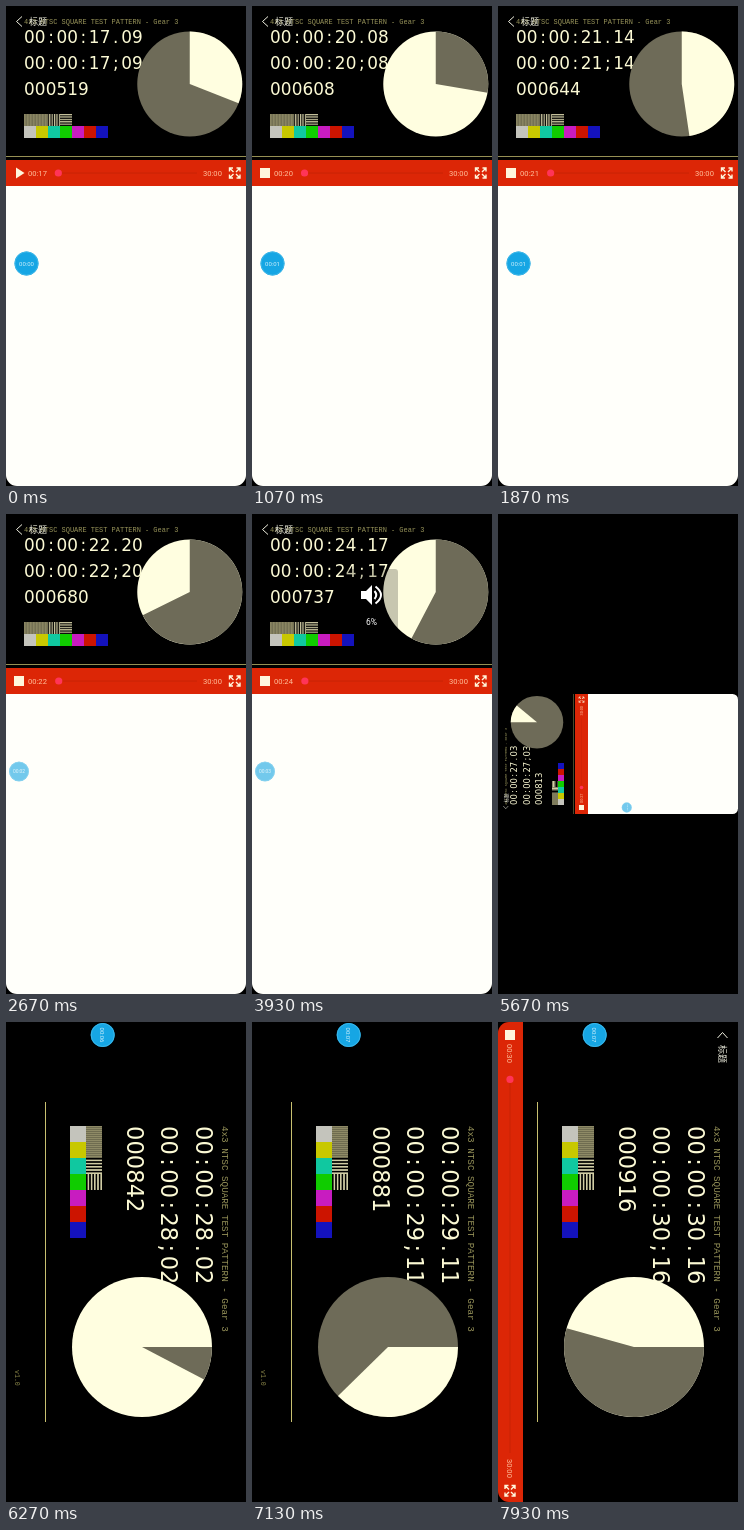
These frames come from a looping animation (240 px wide and 480 px high, 8 s). An HTML page:

```html
<!DOCTYPE html>
<html lang="zh">
<head>
<meta charset="utf-8">
<title>Player</title>
<style>
  html, body { margin: 0; width: 100%; height: 100%; overflow: hidden; background: #000; }
  svg { display: block; width: 100vw; height: 100vh; }
  .mono { font-family: "Liberation Mono", monospace; }
  .digits { font-family: "DejaVu Sans", sans-serif; font-size: 22.5px; text-anchor: middle; fill: #fbf9d4; }
  .ui { font-family: Roboto, sans-serif; }
  .cjk { font-family: "Noto Sans CJK SC", "Noto Sans CJK", sans-serif; }
</style>
</head>
<body>
<svg viewBox="0 0 240 480">
  <defs>
    <clipPath id="corners"><rect id="cornerRect" rx="11"/></clipPath>
    <pattern id="fine" width="2" height="2" patternUnits="userSpaceOnUse">
      <rect width="2" height="2" fill="#6f6c50"/><rect width="1" height="2" fill="#8e8a66"/>
    </pattern>
    <pattern id="cols" width="3.2" height="4" patternUnits="userSpaceOnUse"><rect width="1.6" height="4" fill="#d0cca4"/></pattern>
    <pattern id="rows" width="4" height="3.2" patternUnits="userSpaceOnUse"><rect width="4" height="1.6" fill="#d0cca4"/></pattern>
  </defs>
  <rect width="240" height="480" fill="#000"/>
  <g id="screen">
    <g clip-path="url(#corners)">
      <rect id="page" y="180" width="240" height="300" fill="#fffffa"/>
      <g id="video">
        <text class="mono" x="24" y="24" font-size="9.28" fill="#98945a">4x3 NTSC SQUARE TEST PATTERN - Gear 3</text>
        <text class="digits" id="code1" y="49.6"/>
        <text class="digits" id="code2" y="84.6"/>
        <text class="digits" id="count" y="118.6"/>
        <rect x="24" y="144" width="32" height="16" fill="url(#fine)"/>
        <rect x="56" y="144" width="16" height="16" fill="url(#cols)"/>
        <rect x="72" y="144" width="16" height="16" fill="url(#rows)"/>
        <g id="bars"/>
        <rect y="200" width="320" height="1" fill="#c8c070"/>
        <text class="mono" x="268" y="231" font-size="6.6" fill="#8a8648">v1.0</text>
        <circle id="disc" cx="245" cy="104" r="70"/>
        <path id="wedge"/>
      </g>
      <g id="controls">
        <path d="M16 10.5L10.5 15.5L16 20.5" fill="none" stroke="#f0f0e0" stroke-width="1"/>
        <text class="cjk" x="23" y="19.4" font-size="9" fill="#f0f0e0">标题</text>
        <g id="bar">
          <rect id="barBack" y="1" height="26" fill="#dc2606"/>
          <path id="track" stroke="#c82204" stroke-width="1"/>
          <path id="play" d="M10 8.5V19.5L18.5 14Z" fill="#fff6dc"/>
          <rect id="stop" x="8" y="9" width="10" height="10" fill="#fff6dc"/>
          <text class="ui" id="now" x="22" y="16.8" font-size="7.6" fill="#ffc09c"/>
          <circle id="knob" cy="14" r="3.6" fill="#ff3458"/>
          <g id="right">
            <text class="ui" x="-43" y="16.8" font-size="7.6" fill="#ffc09c">30:00</text>
            <path d="M-16.5 12.5V9H-13M-16.5 9L-12.5 13M-9.5 9H-6V12.5M-6 9L-10 13M-16.5 15.5V19H-13M-16.5 19L-12.5 15M-9.5 19H-6V15.5M-6 19L-10 15" fill="none" stroke="#fff6dc" stroke-width="1.4"/>
          </g>
        </g>
      </g>
      <g id="volume">
        <rect x="94" y="55" width="52" height="63" rx="3" fill="#000" opacity=".22"/>
        <path d="M109 77H114L120 71V91L114 85H109Z" fill="#fff"/>
        <path d="M122.5 77Q126 81 122.5 85M123.5 72.5Q134.5 81 123.5 89.5" fill="none" stroke="#fff" stroke-width="2"/>
        <text class="ui" x="119.5" y="111" font-size="8.5" text-anchor="middle" fill="#fff">6%</text>
      </g>
      <g id="bubble">
        <circle r="12" fill="#16a6e4"/>
        <circle r="11.5" fill="none" stroke="#3cb6e8" stroke-width="1"/>
        <text class="ui" id="rec" y="2.2" font-size="6" text-anchor="middle" fill="#d0f0fc"/>
      </g>
    </g>
  </g>
</svg>
<script>
const LOOP = 8000, STEP = 1000 / 15;
const LIGHT = '#fffee0', DARK = '#6e6b58';
const $ = id => document.getElementById(id);
const set = (id, attrs) => { for (const k in attrs) $(id).setAttribute(k, attrs[k]); };
const show = (id, on) => set(id, { display: on ? 'inline' : 'none' });
const pad = (n, len = 2) => String(n).padStart(len, '0');

$('bars').innerHTML = ['#c4c4bc', '#c8c800', '#10c8a0', '#10cc00', '#c81cc0', '#cc1400', '#1412bc']
  .map((c, i) => `<rect x="${24 + i * 16}" y="160" width="16" height="16" fill="${c}"/>`).join('');

// fixed-pitch digits
for (const id of ['code1', 'code2', 'count'])
  set(id, { x: Array.from({ length: 11 }, (_, i) => (31.2 + i * 14.4).toFixed(1)).join(' ') });

const TURN = 5600, BLANK = 5730, WIDE = 5870, BAR = 7600;

function videoFrame(t) {
  if (t < 66) return 519;
  if (t >= TURN && t < BLANK) return 813;
  return 560 + 3 * Math.floor((t + 4) / STEP) - (t >= BAR ? 1 : 0);
}

function drawVideo(n) {
  const sec = Math.floor(n / 30), fr = n % 30, odd = sec % 2;
  $('code1').textContent = `00:00:${pad(sec)}.${pad(fr)}`;
  $('code2').textContent = `00:00:${pad(sec)};${pad(fr)}`;
  $('count').textContent = pad(n, 6);
  const a = (fr + 0.3) / 30 * 2 * Math.PI;
  set('disc', { fill: odd ? DARK : LIGHT });
  set('wedge', {
    fill: odd ? LIGHT : DARK,
    d: `M245 104V34A70 70 0 ${a > Math.PI ? 1 : 0} 1 ${245 + 70 * Math.sin(a)} ${104 - 70 * Math.cos(a)}Z`
  });
}

function drawBar(n, w, y, playing) {
  const knob = 51 + (w - 103) * n / 54000;
  set('bar', { transform: `translate(0 ${y})` });
  set('barBack', { width: w });
  set('track', { d: `M${knob} 14H${w - 49}` });
  set('knob', { cx: knob });
  set('right', { transform: `translate(${w} 0)` });
  $('now').textContent = '00:' + pad(Math.floor(n / 30));
  show('play', !playing);
  show('stop', playing);
}

function drawBubble(t, wide) {
  const u = Math.min(1, Math.max(0, (t - 2000) / 300));
  const k = wide ? 0 : u * u * (3 - 2 * u);
  const x = wide ? 13 : 20.5 - 7.5 * k, y = wide ? 143.3 : 257.5;
  set('bubble', { transform: `translate(${x} ${y}) scale(${1 - 0.18 * k})`, opacity: 1 - 0.4 * k });
  $('rec').textContent = '00:' + pad(Math.floor(t / 1000));
}

function render(t) {
  const wide = t >= WIDE, turned = t >= TURN && !wide;
  const w = wide ? 480 : 240, n = videoFrame(t);
  show('screen', t < BLANK || wide);
  set('screen', {
    transform: wide ? 'matrix(0 1 -1 0 240 0)' : turned ? 'matrix(0 -.5 .5 0 0 300)' : 'translate(0 0)'
  });
  set('cornerRect', { width: w, height: 720 - w });
  set('video', { transform: wide ? 'translate(80 0)' : 'scale(.75)' });
  show('page', !wide);
  show('controls', !wide || t >= BAR);
  show('volume', t >= 3500 && t < 4500);
  drawVideo(n);
  drawBar(n, w, wide ? 214 : 153, t >= 66);
  drawBubble(t, wide);
}

const start = performance.now();
function tick() {
  render((performance.now() - start) % LOOP);
  requestAnimationFrame(tick);
}
tick();
</script>
</body>
</html>
```
